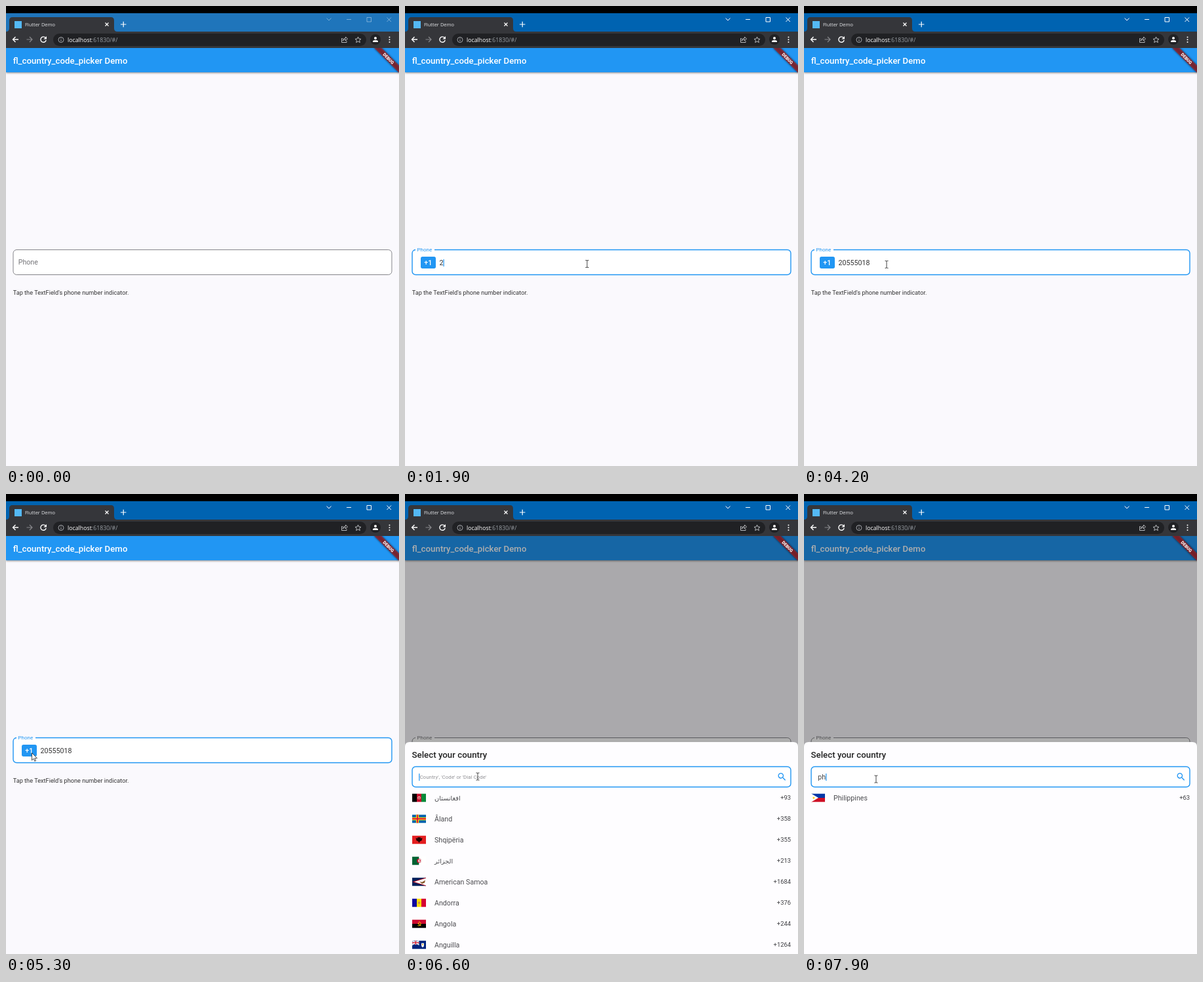
Write an HTML page that moves like this. It is 600 px wide and 701 px high and loops after 8 s.

```html
<!DOCTYPE html>
<html lang="en">
<head>
<meta charset="utf-8">
<title>Country code picker</title>
<style>
  html, body { margin: 0; width: 100%; height: 100%; overflow: hidden; background: #faf9fd; }
  svg { display: block; }
  text { font-family: Roboto, sans-serif; white-space: pre; }
  .ui { font-family: "Open Sans", "Noto Sans", sans-serif; }
  .arabic { font-family: "DejaVu Sans", sans-serif; }
  .line { fill: none; stroke: #fff; }
  .body { font-size: 10.67px; }
  .medium { font-weight: 500; font-size: 13.3px; }
</style>
</head>
<body>
<svg width="600" height="701" viewBox="0 0 600 701">
  <!-- browser window -->
  <rect width="600" height="11"/>
  <rect id="titlebar" y="11" width="600" height="29"/>
  <path fill="#35363a" d="M0 39Q5 39 5 34V22Q5 17 10 17H160Q165 17 165 22V34Q165 39 170 39H600V64H0Z"/>
  <rect x="13" y="23" width="11" height="11" fill="#54b9f5"/>
  <text class="ui" x="29" y="31" font-size="7.5" fill="#e4e5e8">Flutter Demo</text>
  <path class="line" d="M151.500 25.500l5 5m0-5l-5 5M175 28h8.500m-4.250-4.250v8.500" stroke-width="1.200"/>
  <path id="controls" class="line" d="M489.500 18.500l3.500 3.500 3.500-3.500M520 20.500h7M551 17.500h6.500v6.500h-6.500zM581.500 17.500l6.500 6.500m0-6.500l-6.500 6.500"/>
  <rect x="72" y="42" width="478" height="19" rx="9.500" fill="#202124"/>
  <path class="line" d="M19 51H10.500m4-4l-4 4 4 4" stroke-width="1.400"/>
  <path class="line" d="M31.500 51H40m-4-4l4 4-4 4" stroke="#87888b" style="stroke:#87888b" stroke-width="1.200"/>
  <path class="line" d="M60.200 48.200A4.200 4.200 0 1 0 61.200 52" stroke-width="1.400"/>
  <path fill="#fff" d="M62 46v4.500h-4.500z"/>
  <g class="line" style="stroke:#a5a8ac">
    <circle cx="84" cy="51.500" r="4"/>
    <path d="M84 51v2.800M84 48.800v1.100"/>
  </g>
  <text class="ui" x="94" y="54.500" font-size="8.800" fill="#9aa0a6"><tspan fill="#fff">localhost</tspan>:61830/#/</text>
  <g class="line" style="stroke:#c6c8cb" stroke-width=".9">
    <path d="M514 49.500h-1.500v6h7.500v-2M514 53q.5-4 4.500-4v-2l3 3-3 3v-2q-3 0-4.500 2z"/>
    <path d="M537.500 47l1.300 3 3.200.3-2.400 2.100.7 3.200-2.800-1.700-2.800 1.700.7-3.200-2.400-2.100 3.200-.3z"/>
  </g>
  <circle cx="564" cy="51" r="8" fill="#202124"/>
  <g fill="#fff">
    <circle cx="564" cy="49" r="2"/>
    <path d="M560 55v-1q0-2 4-2t4 2v1z"/>
    <circle cx="585.500" cy="47.500" r="1"/><circle cx="585.500" cy="51.200" r="1"/><circle cx="585.500" cy="55" r="1"/>
  </g>

  <!-- page -->
  <svg y="64" width="600" height="637" viewBox="0 64 600 637">
    <rect y="64" width="600" height="637" fill="#faf9fd"/>
    <rect y="60" width="600" height="41" fill="#2196f3" style="filter:drop-shadow(0 1px 1.500px #0007)"/>
    <text class="medium" x="10.700" y="88" fill="#fff">fl_country_code_picker Demo</text>
    <path id="outline" fill="#fff"/>
    <text id="label">Phone</text>
    <g id="chip">
      <rect x="24" y="382" width="23" height="18" rx="2.700" fill="#2196f3"/>
      <text class="body" x="35.300" y="395" text-anchor="middle" fill="#fff" font-weight="500">+1</text>
    </g>
    <text id="phone" class="body" x="52.500" y="395" fill="#333"></text>
    <rect id="phoneCaret" y="386" width="1.200" fill="#2196f3"/>
    <text x="10.700" y="440.300" font-size="9.200" fill="#333">Tap the TextField's phone number indicator.</text>

    <g id="sheet">
      <rect y="64" width="600" height="637" fill-opacity=".32"/>
      <path fill="#fefdff" d="M0 701V385q0-7 7-7H593q7 0 7 7V701z"/>
      <text class="medium" x="10.500" y="402" fill="#222">Select your country</text>
      <rect id="search" x="11" y="415.500" width="578" height="31" rx="5.300" fill="#fff"/>
      <path id="glass" transform="translate(567.500 423) scale(.667)" d="M15.500 14h-.79l-.28-.27A6.470 6.470 0 0 0 16 9.500 6.500 6.500 0 1 0 9.500 16c1.610 0 3.090-.59 4.230-1.570l.27.28v.79l5 4.990L20.490 19l-4.990-5zm-6 0C7.010 14 5 11.990 5 9.500S7.010 5 9.500 5 14 7.010 14 9.500 11.990 14 9.500 14z"/>
      <text id="hint" x="21" y="433.700" font-size="8" fill="#929296">'Country', 'Code' or 'Dial Code'</text>
      <text id="query" class="body" x="21.300" y="434.700" fill="#444"></text>
      <rect id="queryCaret" y="426" width="1.200" height="11" fill="#2196f3"/>
      <g id="all"></g>
      <g id="found"></g>
    </g>

    <g transform="translate(600 64) rotate(45)">
      <rect x="-27" y="18.700" width="54" height="8" fill="#000a" style="filter:blur(1.500px)"/>
      <rect x="-27" y="18.700" width="54" height="8" fill="#b71c1c" fill-opacity=".63"/>
      <text y="25" font-size="6.500" font-weight="900" text-anchor="middle" fill="#fff">DEBUG</text>
    </g>
  </svg>

  <path id="beam" fill="none" stroke="#333" stroke-width=".9" d="M-2.500-5.500H-1Q0-5.500 0-4.500 0-5.500 1-5.500H2.500M0-4.500V4.500M-2.500 5.500H-1Q0 5.500 0 4.500 0 5.500 1 5.500H2.500"/>
  <path id="arrow" fill="#fff" stroke="#222" stroke-width=".8" d="M0 0V11.300L2.600 8.800 4.300 12.700 6 12 4.300 8.200H8z"/>
</svg>

<script>
const $ = id => document.getElementById(id);
const set = (id, attrs) => { for (const k in attrs) $(id).setAttribute(k, attrs[k]); };
const show = (el, on) => el.style.display = on ? '' : 'none';
const clamp = v => Math.max(0, Math.min(1, v));
const BLUE = '#2196f3';

// flags on a 21 x 13 field
const box = (x, y, w, h, c) => `<rect x="${x}" y="${y}" width="${w}" height="${h}" fill="${c}"/>`;
const dot = (x, y, r, c) => `<circle cx="${x}" cy="${y}" r="${r}" fill="${c}"/>`;
const shape = (d, c) => `<path d="${d}" fill="${c}"/>`;
const thirds = (...c) => c.map((f, i) => box(i * 7, 0, 7, 13, f)).join('');
const cross = (w, c) => box(8 - w / 2, 0, w, 13, c) + box(0, 6.5 - w / 2, 21, w, c);
const flags = {
  af: thirds('#000', '#c8102e', '#078a3a') + dot(10.5, 6.5, 2.3, '#f0c8c0') + dot(10.5, 6.7, 1.2, '#c8102e'),
  ax: box(0, 0, 21, 13, '#0064ae') + cross(4.4, '#ffd300') + cross(2, '#d81c3f'),
  al: box(0, 0, 21, 13, '#e41e20') + shape('M10.5 3l1.500-.8 1 1.300-1 .8 3.500-.6-1 4-2.500 1-1.500 2.500-1.500-2.500-2.500-1-1-4 3.500.6-1-.8 1-1.300z', '#200'),
  dz: box(0, 0, 10.5, 13, '#006233') + box(10.5, 0, 10.5, 13, '#fff') +
      dot(10.5, 6.5, 3.3, '#d21034') + dot(11.5, 6.5, 2.5, '#e8d8d4') + dot(12, 6.5, 1, '#d21034'),
  as: box(0, 0, 21, 13, '#00205b') + shape('M21 0L0 6.500 21 13z', '#bd1021') +
      shape('M21 1L3 6.500 21 12z', '#fff') + shape('M11 6l4 1 5-3-1 4-4 1.500z', '#8a5a2b'),
  ad: thirds('#10069f', '#fedd00', '#d50032') + dot(10.5, 6.5, 2, '#c7a05a') + dot(10.5, 6.5, 1, '#d58a30'),
  ao: box(0, 0, 21, 6.5, '#cc092f') + box(0, 6.5, 21, 6.5, '#000') +
      '<path d="M10 3.500a3 3 0 1 1-1.500 5.500M8.500 6l5 3.500" fill="none" stroke="#ffcb00"/>' + dot(9.7, 5.6, .8, '#ffcb00'),
  ai: box(0, 0, 21, 13, '#00247d') +
      '<path d="M0 0l10.500 6.500M10.500 0L0 6.500" stroke="#fff" stroke-width="1.500"/>' +
      box(4, 0, 2.5, 6.5, '#fff') + box(0, 2, 10.5, 2.5, '#fff') +
      box(4.6, 0, 1.3, 6.5, '#cf142b') + box(0, 2.6, 10.5, 1.3, '#cf142b') +
      shape('M14 4h4v3.500q0 2-2 3-2-1-2-3z', '#fff') + dot(16, 6, 1, '#f90'),
  ph: box(0, 0, 21, 6.5, '#0038a8') + box(0, 6.5, 21, 6.5, '#ce1126') +
      shape('M0 0L11 6.500 0 13z', '#fff') + dot(3.8, 6.5, 1.5, '#fcd116')
};

function row([code, name, dial], i) {
  const y = 463 + 32 * i, arabic = name > '\u0600';
  let boxes = '';
  if (arabic) for (let n = 0; n < name.length; n++)
    boxes += `M${45.3 + 4.75 * n} ${y - 3.5}h4v7h-4zl4 7m0-7l-4 7`;
  return `<svg class="${code === 'af' ? '' : 'flag'}" x="11" y="${y - 6.5}" width="21" height="13">${flags[code]}</svg>
    <path class="tofu" d="${boxes}" fill="none" stroke="#777" stroke-width=".5"/>
    <text class="${arabic ? 'arabic' : 'body'}" x="45" y="${y + 3.8}" font-size="9.800" fill="#4c4c50">${name}</text>
    <text x="589" y="${y + 3.3}" font-size="9.400" text-anchor="end" fill="#3c3c40">+${dial}</text>`;
}
$('all').innerHTML = [
  ['af', 'افغانستان', 93], ['ax', 'Åland', 358], ['al', 'Shqipëria', 355], ['dz', 'الجزائر', 213],
  ['as', 'American Samoa', 1684], ['ad', 'Andorra', 376], ['ao', 'Angola', 244], ['ai', 'Anguilla', 1264]
].map(row).join('');
$('found').innerHTML = row(['ph', 'Philippines', 63], 0);
const each = (sel, on) => $('all').querySelectorAll(sel).forEach(el => show(el, on));

// typing: text so far and a caret that blinks anew after each key
function typed(t, text, focus, keys) {
  const n = keys.filter(k => k <= t).length;
  const since = Math.max(0, t - (n ? keys[n - 1] : focus));
  return { text: text.slice(0, n), n, caret: Math.floor(since / 500) % 2 === 0 };
}

const path = [
  [100, 596, 424], [600, 278, 393], [3900, 278, 393], [4300, 98, 394], [4400, 98, 394],
  [5000, 39.5, 394.5], [5600, 39.5, 394.5], [6100, 90, 457], [6500, 111, 430.5],
  [7800, 111, 430.5], [7900, 110, 434.5], [8000, 110, 434.5]
];
function pointer(t) {
  const i = Math.max(1, path.findIndex(p => p[0] >= t));
  const [t0, x0, y0] = path[i - 1], [t1, x1, y1] = path[i];
  const u = clamp((t - t0) / (t1 - t0)), e = u * u * (3 - 2 * u);
  return [x0 + (x1 - x0) * e, y0 + (y1 - y0) * e];
}

function draw(t) {
  const active = t >= 700, open = t >= 5400, searching = t >= 6500;
  set('titlebar', { fill: active ? '#0063b1' : '#1f75bb' });
  set('controls', { opacity: active ? 1 : .4 });

  // phone field
  const p = clamp((t - 900) / 200), focused = p > 0 && !open;
  set('outline', {
    d: `M${16 + 29 * p} 371.500H583.700a5.300 5.300 0 0 1 5.300 5.300V404.200a5.300 5.300 0 0 1-5.300 5.300H16.300a5.300 5.300 0 0 1-5.300-5.300V376.800a5.300 5.300 0 0 1 5-5.300`,
    stroke: focused ? BLUE : '#85858a', 'stroke-width': focused ? 1.4 : 1
  });
  set('label', { x: 18.7 - .2 * p, y: 394 - 20 * p, 'font-size': 10.67 - 2.67 * p, fill: focused ? BLUE : '#757579' });
  set('chip', { opacity: clamp((t - 900) / 200) });
  const num = typed(t, '20555018', 1000, [1900, 2100, 2300, 2500, 3000, 3200, 3300, 3500]);
  $('phone').textContent = num.text;
  set('phoneCaret', { x: 52.5 + 6 * num.n, height: t < 1000 ? 10 : 11 });
  show($('phoneCaret'), t >= 900 && !open && num.caret);

  // country sheet
  show($('sheet'), open);
  each('.flag', t >= 5500);
  each('.tofu', t < 5800);
  each('.arabic', t >= 5800);
  set('search', { stroke: searching ? BLUE : '#85858a', 'stroke-width': searching ? 1.4 : 1 });
  set('glass', { fill: searching ? BLUE : '#85858a' });
  const q = typed(t, 'ph', 6500, [7400, 7600]);
  $('query').textContent = q.text;
  set('queryCaret', { x: 21.2 + 6 * q.n });
  show($('queryCaret'), searching && q.caret);
  show($('hint'), !q.n);
  show($('all'), q.n < 2);
  show($('found'), q.n === 2);

  // mouse
  const [x, y] = pointer(t);
  const onText = open ? y > 416 && y < 447 : x > 50 && y > 371 && y < 410;
  for (const id of ['beam', 'arrow']) set(id, { transform: `translate(${x} ${y})` });
  show($('beam'), t >= 100 && onText);
  show($('arrow'), t >= 100 && !onText);
}

const start = performance.now();
function tick(now) {
  const t = Math.max(0, now - start) % 8000;
  draw(Math.floor(t / 100) * 100);
  requestAnimationFrame(tick);
}
draw(0);
requestAnimationFrame(tick);
</script>
</body>
</html>
```
